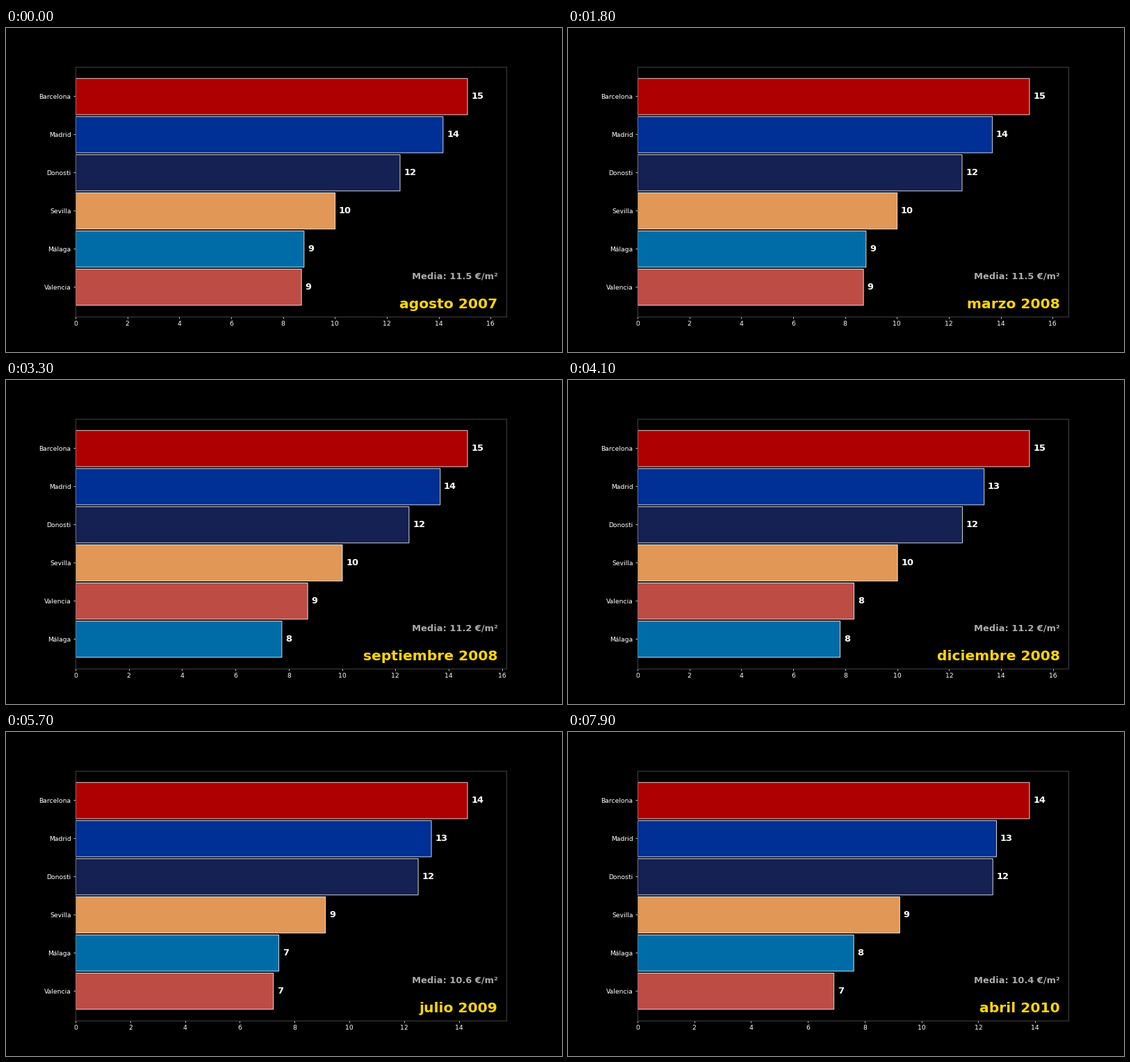
Recreate the animation shown at these times as a matplotlib script. Size 800 by 467 pixels, loop 8000 ms.

```python
import numpy as np
import matplotlib.pyplot as plt
from matplotlib.animation import FuncAnimation
from matplotlib.ticker import MultipleLocator
from matplotlib.transforms import ScaledTranslation

FRAMES, INTERVAL = 80, 100
PT = 2 / 3          # base point size on this stage
RATE = 0.4          # months per frame
BAR = 0.95          # bar thickness in slots

MONTHS = ("enero febrero marzo abril mayo junio julio agosto "
          "septiembre octubre noviembre diciembre").split()


class City:
    """A price that starts level and makes linear moves (from, to, change)."""

    def __init__(self, name, colour, start, *moves):
        self.name, self.colour = name, colour
        self.start, self.moves = start, moves

    def price(self, t):
        return self.start + sum(np.interp(t, (a, b), (0, change))
                                for a, b, change in self.moves)


CITIES = [
    City("Barcelona", "#c70000", 15.1, (10, 13, -0.5), (13, 15, 0.5),
         (16, 20, -0.13), (20, 22, -0.67), (23, 26, -0.45), (26, 32, -0.06)),
    City("Madrid", "#0036a9", 14.17, (0, 7, -0.5), (14, 19, -0.65),
         (22, 32, -0.4)),
    City("Donosti", "#18255e", 12.5),
    City("Sevilla", "#ffac61", 10, (20, 22, -0.86), (22, 26, -0.1),
         (26, 32, 0.19)),
    City("Valencia", "#d7574f", 8.7, (14, 20, -0.87), (20, 23, -0.62),
         (23, 32, -0.31)),
    City("Málaga", "#007bbe", 8.8, (11, 13, -1.07), (14, 19, 0.12),
         (20, 23, -0.44), (23, 32, 0.2)),
]
NAMES = [city.name for city in CITIES]


def prices(t):
    return np.array([city.price(t) for city in CITIES])


def ranks(month):
    """Slot of each city, 6 at the top and 1 at the bottom."""
    return prices(month).argsort().argsort() + 1.0


def slots(t):
    month = int(t)
    a, b = ranks(month), ranks(month + 1)
    return a + (b - a) * (t - month)


def period(frame):
    n = 7 + int(RATE * frame + 0.45)
    return f"{MONTHS[n % 12]} {2007 + n // 12}"


plt.rcParams["font.family"] = "DejaVu Sans"
fig = plt.figure(figsize=(8, 4.67), dpi=100, facecolor="black")
ax = fig.add_axes([0.125, 0.11, 0.775, 0.77], facecolor="black")
ax.xaxis.set_major_locator(MultipleLocator(2))
ax.tick_params(color="white", labelcolor="white", labelsize=10 * PT,
               length=3.5 * PT, width=0.8 * PT, pad=3.5 * PT)
for spine in ax.spines.values():
    spine.set(color="#555555", linewidth=0.8 * PT)

bars = ax.barh(range(1, 7), prices(0), height=BAR, alpha=0.885,
               color=[city.colour for city in CITIES],
               edgecolor="white", linewidth=PT)
nudge = ScaledTranslation(0.004, -0.004, fig.dpi_scale_trans)
for bar in bars:
    bar.set(snap=False, transform=ax.transData + nudge)


def label(x, y, size, color="white", **style):
    return ax.text(x, y, "", size=size * PT, color=color, weight="bold",
                   **style)


corner = dict(transform=ax.transAxes, ha="right")
tags = [label(0, 0, 14, va="center") for _ in CITIES]
mean_text = label(0.98, 0.151, 14, "#aaaaaa", **corner)
date_text = label(0.98, 0.033, 21.9, "gold", **corner)


def update(frame):
    t = RATE * frame + 0.175
    values, rows = prices(t), slots(t)
    top = values.max()
    ax.set_xlim(0, top * 1.1)
    ax.set_yticks(rows, labels=NAMES)
    ax.set_ylim(0.2275, 6.7725)
    for bar, tag, value, row in zip(bars, tags, values, rows):
        bar.set_width(value)
        bar.set_y(row - BAR / 2)
        tag.set_position((value + top * 0.01, row))
        tag.set_text(f"{value:.0f}")
    mean_text.set_text(f"Media: {values.mean():.1f} €/m²")
    date_text.set_text(period(frame))
    return [*bars, *tags, mean_text, date_text]


anim = FuncAnimation(fig, update, frames=FRAMES, interval=INTERVAL,
                     repeat=True, repeat_delay=0, blit=False)
plt.show()
```
